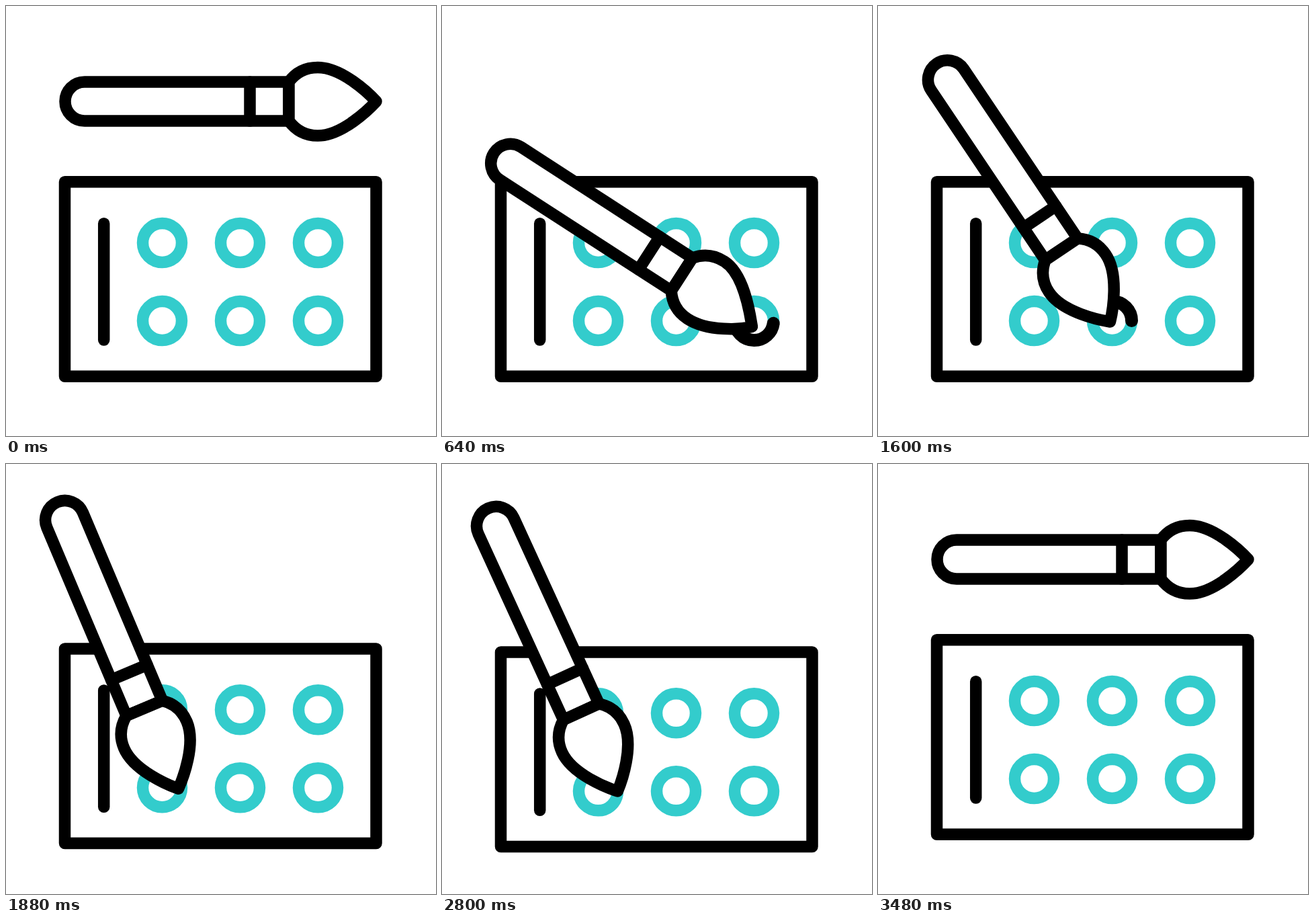
Animation of 640x640 px, one loop 3.88 s. Source, as an HTML page:

```html
<!DOCTYPE html>
<html lang="en">
<head>
<meta charset="utf-8">
<title>Paintbrush and palette</title>
<style>
  html, body { margin: 0; height: 100%; overflow: hidden; background: #fff; }
  svg { display: block; width: 100vw; height: 100vh; }
  path, rect, circle { fill: none; stroke: #000; stroke-width: 17.5; stroke-linecap: round; stroke-linejoin: round; }
  .paint { stroke: #3cc; }
  .stroke { stroke-width: 19; }
  .solid { fill: #fff; }
</style>
</head>
<body>
<svg viewBox="0 0 640 640">
  <g id="board">
    <rect x="87.5" y="261.7" width="463.5" height="289.5"/>
    <path d="M145.7 323.7V497"/>
  </g>
  <g id="brush">
    <g transform="translate(-551 -142)">
      <path class="solid" d="M421 113H117a29 29 0 0 0 0 58H421Z"/>
      <path d="M363 113v58"/>
      <path class="solid" id="bristles"/>
    </g>
  </g>
</svg>
<script>
const LOOP = 3880, STEP = 40;
const VISIT = 760, DAB = 480, RETURN_AT = 2760;
const REST = { x: 551, y: 142, angle: 0 };
const [board, brush, bristles] = ['board', 'brush', 'bristles'].map(id => document.getElementById(id));

const ramp = (t, start, length) => Math.min(1, Math.max(0, (t - start) / length));
const easeOut = (p, power = 2) => 1 - (1 - p) ** power;
const mix = (a, b, p) => a + (b - a) * p;
const mixPose = (a, b, px, py = px, pa = px) =>
  ({ x: mix(a.x, b.x, px), y: mix(a.y, b.y, py), angle: mix(a.angle, b.angle, pa) });

function addRing(cx, cy, className) {
  const ring = document.createElementNS('http://www.w3.org/2000/svg', 'circle');
  const attrs = { cx, cy, r: 29, class: className, pathLength: 360 };
  for (const name in attrs) ring.setAttribute(name, attrs[name]);
  return board.appendChild(ring);
}

const columns = [464.5, 348.5, 232.5];
for (const cy of [352.5, 468.5]) columns.forEach(cx => addRing(cx, cy, 'paint'));

// The brush visits the lower rings from right to left.
const visits = [30, 52.6, 67.1].map((angle, i) => {
  const cx = columns[i], arrive = 360 + i * VISIT;
  return {
    arrive,
    depart: i ? arrive - VISIT + DAB : 0,
    enter: { x: cx + 24, y: 470, angle },
    leave: { x: cx - 3, y: 470, angle: angle + 3.5 },
    ring: addRing(cx, 468.5, 'stroke')
  };
});

function drawStroke({ ring, arrive }, t) {
  const head = 360 * ramp(t, arrive + 30, DAB - 30);
  const tail = 360 * easeOut(ramp(t, arrive + 275, VISIT - 275));
  ring.style.display = head > tail ? '' : 'none';
  ring.setAttribute('stroke-dasharray', `${head - tail} 720`);
  ring.setAttribute('stroke-dashoffset', -tail);
}

function draw(t) {
  const drop = 20.4 * (ramp(t, 1600, 430) - ramp(t, RETURN_AT, 400));
  board.setAttribute('transform', `translate(0 ${drop})`);

  let pose = REST, bend = 0;
  for (const visit of visits) {
    const dab = ramp(t, visit.arrive, DAB);
    pose = mixPose(pose, visit.enter, ramp(t, visit.depart, visit.arrive - visit.depart));
    pose = mixPose(pose, visit.leave, easeOut(dab));
    bend += 9 * Math.sin(Math.PI * dab);
    drawStroke(visit, t);
  }
  pose.y += t < RETURN_AT ? drop : 20.4;

  // Swing back to rest along an arc.
  const back = ramp(t, RETURN_AT, 720);
  pose = mixPose(pose, REST, easeOut(back, 1.82), back ** 1.6, easeOut(back, 1.34));

  brush.setAttribute('transform', `translate(${pose.x} ${pose.y}) rotate(${pose.angle})`);
  bristles.setAttribute('d', `M421 113C432 98 446 91.5 464 91.5C500 91.5 540 ${130 + bend} 551 ${142 + bend}` +
    `C540 ${154 + bend} 500 193 464 193C446 193 432 186 421 171Z`);
}

const began = performance.now();
function tick() {
  const t = (performance.now() - began) % LOOP;
  draw(Math.floor(t / STEP) * STEP);
  requestAnimationFrame(tick);
}
tick();
</script>
</body>
</html>
```
